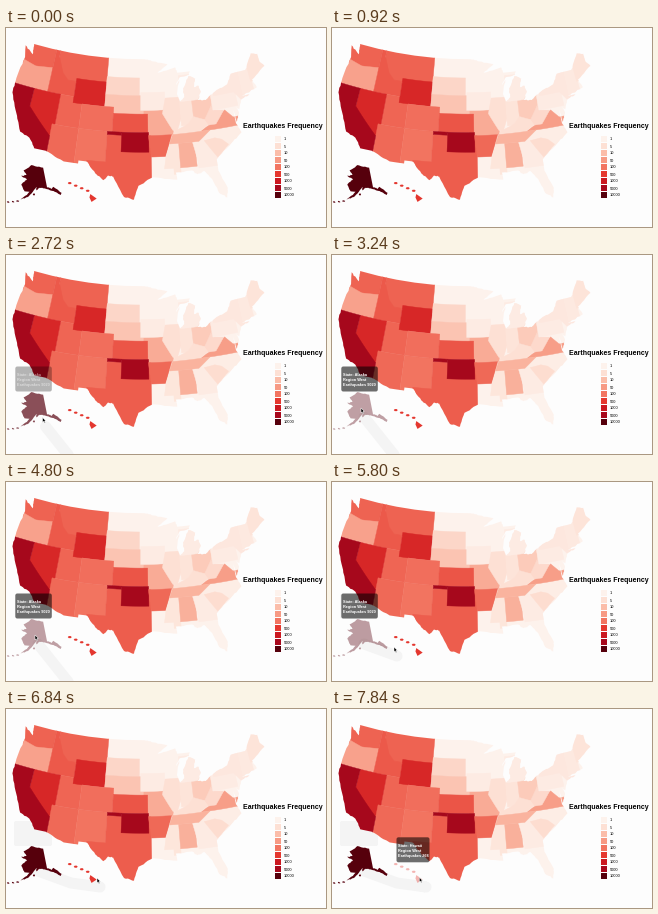
A matplotlib script that plays this animation: 320x199 px, repeating every 8000 ms.

```python
import numpy as np
import matplotlib.pyplot as plt
from matplotlib.animation import FuncAnimation
from matplotlib.colors import LinearSegmentedColormap
from matplotlib.patches import FancyBboxPatch, Polygon, Rectangle
from matplotlib.path import Path

W, H, DPI = 320, 199, 100
STEP, FRAMES = 40, 200
SCALE = 349
CENTER = np.array([132.3, 94.1])
PT = 72 / DPI
FONT = "Liberation Sans"
BACKDROP, GHOST = "#fdfdfd", "#f4f4f4"
RAMP = ["#fdf2ec", "#fde0d4", "#fbbda9", "#f79a84", "#f27561",
        "#e5382f", "#cb1820", "#a8081c", "#56000c"]
reds = LinearSegmentedColormap.from_list("frequency", RAMP)
rng = np.random.default_rng(4)


def conic(lon0, middle, parallels, scale, origin):
    """Make an equal-area conic projection from lon/lat to stage pixels."""
    s1, s2 = np.sin(np.radians(parallels))
    n = (s1 + s2) / 2
    c = 1 - s1 ** 2 + 2 * n * s1

    def raw(lon, lat):
        rho = np.sqrt(c - 2 * n * np.sin(np.radians(lat))) / n
        theta = n * np.radians(lon)
        return np.array([rho * np.sin(theta), rho * np.cos(theta)])

    return lambda ring: origin + scale * (
        raw(ring[:, 0] - lon0, ring[:, 1]).T - raw(*middle))


mainland = conic(-96, (-0.6, 38.7), (29.5, 45.5), SCALE, CENTER)
alaska = conic(-154, (-2, 58.5), (55, 65), 0.35 * SCALE,
               CENTER + SCALE * np.array([-0.307, 0.201]))
hawaii = conic(-157, (-3, 19.9), (8, 18), SCALE,
               CENTER + SCALE * np.array([-0.205, 0.212]))


def shape(coords, project, rough=0):
    """Project a closed ring; only edges off the lon/lat grid get rough."""
    ring = np.reshape(coords, (-1, 2)).astype(float)
    k = np.linspace(0, 1, 6, endpoint=False)[:, None]
    edges = []
    for a, b in zip(ring, np.roll(ring, -1, axis=0)):
        wobble = rough * np.all(a != b) * np.sin(np.pi * k)
        edges.append(a + (b - a) * k + wobble * rng.uniform(-1, 1, (6, 2)))
    return project(np.concatenate(edges))


fig = plt.figure(figsize=(W / DPI, H / DPI), dpi=DPI, facecolor=BACKDROP)
ax = fig.add_axes([0, 0, 1, 1])
ax.set(xlim=(0, W), ylim=(H, 0))
ax.axis("off")

# Key points of the outline, clockwise from the north-west corner
NORTH = [-122.8, 49, -95.2, 49, -93, 48.6, -89.6, 48, -92.1, 46.7,
         -87.8, 47.4, -87.4, 46.5, -84.4, 46.5, -84.8, 45.95, -87, 45.7,
         -88, 44.5, -87.1, 45.2, -87.9, 43, -87.4, 41.7, -86.3, 42.4,
         -86.4, 43.8, -84.8, 45.8, -83.4, 45.2, -83.9, 43.8, -82.9, 44,
         -82.5, 43, -83.4, 41.7, -81.7, 41.5, -78.9, 42.8, -76.3, 43.4,
         -75, 45, -71.5, 45, -69.2, 47.4, -67.8, 47, -67.8, 45.7]
EAST = [-67, 44.8, -70.6, 43.2, -70, 41.8, -73.8, 41, -72, 41, -74, 40.5,
        -74.9, 39, -75.4, 39.4, -75.1, 38.5, -76, 37.1, -76.2, 39.2,
        -76.2, 36.9, -75.5, 35.3, -77.9, 33.9, -81.3, 31.7, -81.3, 29.8,
        -80.1, 26.8, -80.5, 25.2, -81.8, 26.2, -82.7, 28.6, -84, 30.1]
SOUTH = [-85.3, 29.7, -86.3, 30.4, -89.4, 30.3, -89.2, 29.1, -93.8, 29.7,
         -96.5, 28.3, -97.3, 26, -99.1, 26.4, -101.3, 29.7, -102.3, 29.8,
         -103.1, 29, -104.7, 30, -106.5, 31.8, -108.2, 31.8, -108.2, 31.3,
         -111, 31.3, -114.8, 32.5]
WEST = [-117.1, 32.5, -118.5, 34, -120.6, 34.6, -122.4, 37.4, -124.4, 40.4,
        -124.5, 42.8, -124, 46.5, -124.7, 48.4, -122.4, 47.3]
coast = shape(NORTH + EAST + SOUTH + WEST, mainland, rough=0.1)
ax.add_patch(Polygon(coast, fc=reds(0), lw=0))
coast_path = Path(np.vstack([coast, coast[:1]]))


def state(level, *coords):
    """Paint a state; the coast trims it and later neighbours overlap it."""
    color = reds(level / 8)
    patch = Polygon(shape(coords, mainland), fc=color, ec=color, lw=0.3)
    ax.add_patch(patch)
    patch.set_clip_path(coast_path, ax.transData)


def box(level, west, south, east, north):
    state(level, west, north, east, north, east, south, west, south)


# West
box(4.3, -125, 45.5, -117, 49.2)                                    # WA
box(4.3, -116, 44.4, -104, 49.2)                                    # MT
state(2.8, -125, 46.3, -121, 45.6, -117, 46, -117, 42, -125, 42)    # OR
state(4.45, -117, 49.2, -116, 49.2, -116, 48, -114.4, 45.5,
      -113, 44.5, -111, 44.5, -111, 42, -117, 42)                   # ID
box(4.25, -114, 37, -109, 42)                                       # UT
box(5.5, -111, 41, -104, 45)                                        # WY
box(5.5, -120, 35, -114, 42)                                        # NV
box(4.2, -114.6, 31, -109, 37)                                      # AZ
state(7, -126, 42, -120, 42, -120, 39, -114.6, 35, -114.6, 32,
      -126, 32)                                                     # CA

# Plains
box(4, -109, 31, -103, 37)                                          # NM
state(4.4, -106.6, 32, -103, 32, -103, 36.5, -94, 36.5, -94, 25,
      -106.6, 25)                                                   # TX
box(1.3, -104, 43, -96.4, 45.9)                                     # SD
box(1.8, -104, 40, -95.6, 43)                                       # NE
box(4.1, -109, 37, -102, 41)                                        # CO
box(2.5, -95.5, 36.5, -89.3, 40.6)                                  # MO
box(4.5, -102, 37, -94.6, 40)                                       # KS
box(7, -103, 36.5, -100, 37)                                        # OK
box(7, -100, 33.8, -94.45, 37)                                      # OK
box(0.4, -96.1, 40.6, -90.7, 43.5)                                  # IA

# Midwest and South
state(4.2, -94.5, 36.5, -89.7, 36.5, -91.2, 33, -94, 33)            # AR
state(0.7, -90.2, 35, -88.2, 35, -88.4, 30, -89.7, 30, -89.7, 31,
      -91.5, 31, -91.1, 33)                                         # MS
box(2.4, -88.4, 31, -85.2, 35)                                      # AL
box(0.3, -84.3, 33.5, -75, 36.55)                                   # NC
state(0.4, -85.6, 35, -83.1, 35, -81, 32, -81, 30.7, -84.9, 30.7,
      -85, 32.3)                                                    # GA
state(1.1, -83.2, 35, -81, 35.2, -79.7, 34.8, -78.5, 33.8, -81, 32)  # SC
state(1, -90.6, 42.5, -87.4, 42.5, -87.5, 39, -88.5, 37, -89.4, 37.2,
      -91.4, 40)                                                    # IL
box(0.8, -87.5, 37.8, -84.8, 41.75)                                 # IN
box(1.6, -84.8, 38.4, -80.5, 42.2)                                  # OH
box(0.4, -87.2, 41.75, -82, 46)                                     # MI
state(2.9, -83.7, 36.6, -75, 36.55, -75, 38, -76.5, 38, -78, 39.4,
      -82, 37.3)                                                    # VA
state(1.2, -82.6, 38.3, -82, 37.4, -80.3, 37.4, -78.2, 39.4,
      -80.5, 39.7, -80.6, 40.6)                                     # WV
state(1, -89.4, 36.5, -83.7, 36.6, -82, 37.5, -82.6, 38.4,
      -84.8, 39.1, -86, 38, -89.1, 37)                              # KY
state(2.3, -89.5, 36.5, -81.7, 36.6, -84.3, 35, -90.3, 35)          # TN

# Northeast
box(0.4, -80.5, 39.7, -75, 42.2)                                    # PA
state(0.6, -79.8, 42, -75.3, 42, -74, 40.5, -71.8, 40.9, -73.4, 41.2,
      -73.3, 45.2, -80, 44)                                         # NY
box(0.5, -73.4, 41.1, -70.8, 45.2)                                  # New England
box(0.8, -71, 43, -66, 48)                                          # ME

ALASKA = [-141, 69.6, -141, 60.3, -137, 59, -135, 59.7, -130, 55.9,
          -131, 55, -136, 57.8, -144, 60, -148, 60.5, -151.5, 59.3,
          -151, 61, -158, 56.5, -164.5, 54.6, -157.5, 58.7, -162, 58.7,
          -166, 61.7, -161, 64.5, -168, 65.6, -162, 66.5, -166.5, 68.3,
          -156.6, 71.3]
BIG_ISLAND = [-155.9, 20.25, -154.8, 19.5, -155.7, 18.95, -156.05, 19.7]


def island(lon, lat, rx, ry):
    a = np.linspace(0, 2 * np.pi, 6, endpoint=False)
    return np.column_stack([lon + rx * np.cos(a), lat + ry * np.sin(a)])


def group(level, project, rough, *rings):
    """Land that reacts to the pointer."""
    return [ax.add_patch(Polygon(shape(ring, project, rough),
                                 fc=reds(level / 8), lw=0, zorder=2))
            for ring in rings]


aleutians = [island(-166.5 - 3.5 * k, 53.7 - 0.75 * k, 1.1, 0.35)
             for k in range(3)]
small_isles = [island(-159.5 + 1.05 * k, 22.05 - 0.42 * k, 0.35, 0.2)
               for k in range(4)]
alaska_parts = group(8, alaska, 0.25, ALASKA,
                     island(-153.5, 57.5, 0.9, 0.5), *aleutians)
hawaii_parts = group(5, hawaii, 0, BIG_ISLAND, *small_isles)


def label(x, y, text, px, **style):
    return ax.text(x, y, text, fontsize=px * PT, family=FONT, **style)


label(237, 100.4, "Earthquakes Frequency", 6.95, weight="bold")
for row, level in enumerate([1, 5, 10, 50, 100, 500, 1000, 5000, 10000]):
    top = 108 + 7 * row
    ax.add_patch(Rectangle((269, top), 6, 6, fc=RAMP[row], lw=0))
    label(277.6, top + 4.5, str(level), 4)


def rounded(x, y, width, height, color, z):
    return ax.add_patch(FancyBboxPatch(
        (x + 2, y + 2), width - 4, height - 4, fc=color, lw=0, zorder=z,
        boxstyle="round,pad=2,rounding_size=2"))


def tooltip(x, y, width, *lines):
    texts = [label(x + 2, y + 9.2 + 5.1 * i, line, 3.85, weight="bold",
                   color="white", zorder=6) for i, line in enumerate(lines)]
    return rounded(x, y, width, 25, "black", 5), texts


alaska_tip = tooltip(9.3, 111.5, 36.5, "State: Alaska", "Region West",
                     "Earthquakes 9020")
hawaii_tip = tooltip(64.5, 128.3, 33, "State: Hawaii", "Region West",
                     "Earthquakes 268")

ARROW = np.array([(0, 0), (0, 4.8), (1.1, 3.9), (1.9, 5.6), (2.8, 5.2),
                  (2, 3.5), (3.4, 3.4)])
cursor = ax.add_patch(Polygon(ARROW, fc="black", ec="white", lw=0.35,
                              zorder=8))

# Pale traces left behind by the first tooltip and by the pointer
tip_ghost = rounded(8, 112, 38, 25, GHOST, 0.5)
trail, = ax.plot([], [], color=GHOST, lw=11 * PT, zorder=0.5,
                 solid_capstyle="round", solid_joinstyle="round")

START = np.array([64, 197])
MOVES = [(2160, 2960, (29, 153)), (4800, 5640, (62, 165)),
         (5800, 6480, (91, 169)), (6840, 7280, (87.3, 168.3))]


def ease(t, begin, end):
    k = np.clip((t - begin) / (end - begin), 0, 1)
    return k * k * (3 - 2 * k)


def pointer(t):
    pos = START
    for begin, end, goal in MOVES:
        pos = pos + (np.array(goal) - pos) * ease(t, begin, end)
    return pos


def show_hover(amount, parts, tip):
    for part in parts:
        part.set_alpha(1 - 0.63 * amount)
    panel, texts = tip
    panel.set_alpha(0.57 * amount)
    for text in texts:
        text.set_alpha(amount)


def draw(frame):
    t = frame * STEP
    show_hover(ease(t, 2480, 2960) - ease(t, 5760, 6320),
               alaska_parts, alaska_tip)
    show_hover(ease(t, 6860, 7280), hawaii_parts, hawaii_tip)
    cursor.set_xy(ARROW + pointer(t))
    cursor.set_visible(t >= MOVES[0][0])

    tip_ghost.set_visible(t >= 5760)
    begin = MOVES[1][0] if t > MOVES[1][0] else MOVES[0][0]
    steps = np.arange(begin, t + 1, STEP)
    path = np.array([pointer(s) for s in steps]).reshape(-1, 2) + (3, 9)
    trail.set_data(path[:, 0], path[:, 1])
    trail.set_visible(len(steps) > 1)
    return []


animation = FuncAnimation(fig, draw, frames=FRAMES, interval=STEP,
                          repeat=True, repeat_delay=0)
plt.show()
```
